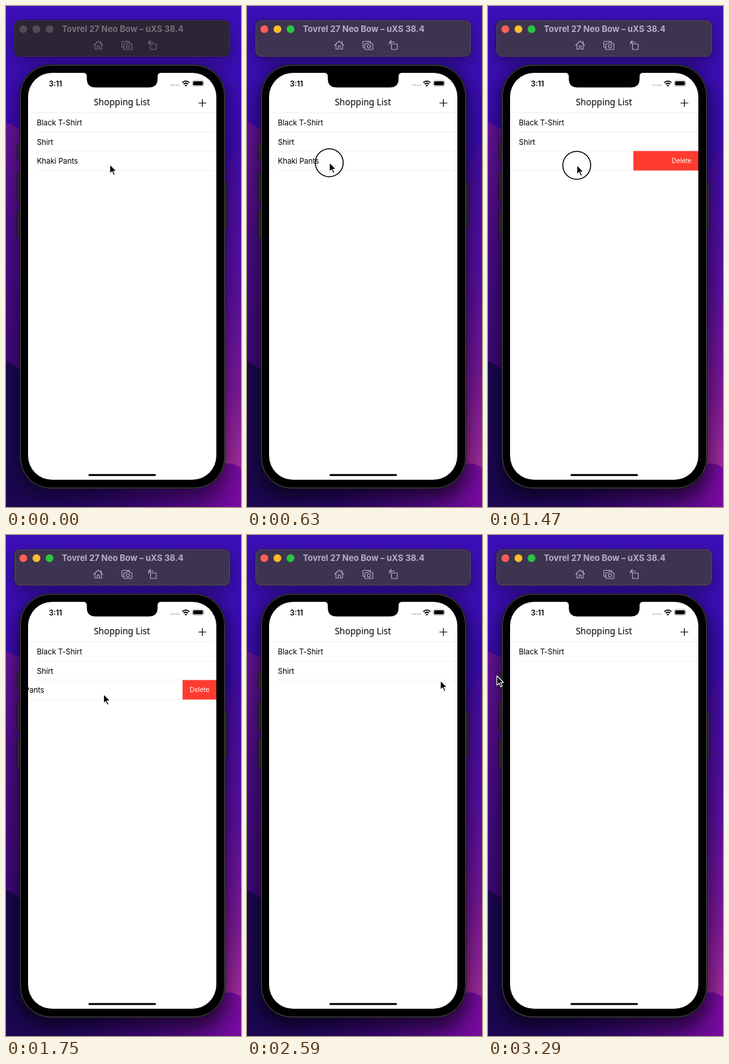
An HTML page for the animation above (3.36 s loop, 362x772 px).

```html
<!DOCTYPE html>
<html lang="en">
<head>
<meta charset="utf-8">
<title>Swipe to delete</title>
<style>
  html, body { margin: 0; width: 100%; height: 100%; overflow: hidden; background: #2c0a80; }
  svg { display: block; width: 362px; height: 772px; }
  text { font-family: Inter, Roboto, sans-serif; white-space: pre; }
  .row text { font-size: 11.5px; letter-spacing: -.03px; }
  .row .del { font-size: 10px; letter-spacing: 0; fill: #fff; }
  .line { stroke: #f0f0f1; stroke-width: 1; }
  .icon { fill: none; stroke-width: 1.1; stroke-linejoin: round; stroke-linecap: round; }
  #bar { --panel: #3e3351; --edge: #574a69; --ink: #b9aec6; --r: #ff5f57; --y: #febc2e; --g: #28c840; }
  #bar.idle { --panel: #2b2536; --edge: #3d3748; --ink: #75707b; --r: #514c58; --y: #514c58; --g: #514c58; }
  #bar .icon { stroke: var(--ink); }
</style>
</head>
<body>
<svg viewBox="0 0 362 772" xmlns="http://www.w3.org/2000/svg">
  <defs>
    <linearGradient id="sky" x2="0" y2="1">
      <stop offset="0" stop-color="#3d0fb9"/>
      <stop offset=".25" stop-color="#3a0cb0"/>
      <stop offset="1" stop-color="#2a0780"/>
    </linearGradient>
    <linearGradient id="hillL" x2="0" y2="1">
      <stop offset="0" stop-color="#68139a"/>
      <stop offset=".4" stop-color="#4c0c88"/>
      <stop offset="1" stop-color="#3a0876"/>
    </linearGradient>
    <linearGradient id="hillR" x2="0" y2="1">
      <stop offset="0" stop-color="#400ca6"/>
      <stop offset=".45" stop-color="#5a0fa0"/>
      <stop offset=".75" stop-color="#7c1899"/>
      <stop offset="1" stop-color="#a52d9f"/>
    </linearGradient>
    <linearGradient id="floor">
      <stop offset="0" stop-color="#1a0750"/>
      <stop offset=".4" stop-color="#2a0768"/>
      <stop offset=".75" stop-color="#500984"/>
      <stop offset="1" stop-color="#780ba0"/>
    </linearGradient>
    <filter id="blur" x="-30%" y="-30%" width="160%" height="160%"><feGaussianBlur stdDeviation="14"/></filter>
    <clipPath id="screen"><rect x="34" y="103" width="290" height="627" rx="37"/></clipPath>
  </defs>

  <rect width="362" height="772" fill="url(#sky)"/>
  <path d="M0 179Q30 190 60 230V600H0Z" fill="url(#hillL)"/>
  <path d="M300 300Q340 255 362 205V720H300Z" fill="url(#hillR)"/>
  <path d="M0 547Q22 555 60 600L300 735Q335 690 362 712V772H0Z" fill="url(#floor)"/>
  <g id="shadow" filter="url(#blur)">
    <rect x="18" y="100" width="323" height="660" rx="46"/>
    <rect x="13" y="32" width="332" height="56" rx="9" opacity=".6"/>
  </g>

  <g id="bar">
    <rect x="12.500" y="21.500" width="333" height="57" rx="9" fill="#160c2a"/>
    <rect x="13.500" y="22.500" width="331" height="55" rx="8" fill="var(--panel)" stroke="var(--edge)"/>
    <circle cx="26.700" cy="35.700" r="6" fill="var(--r)"/>
    <circle cx="46.900" cy="35.700" r="6" fill="var(--y)"/>
    <circle cx="67.100" cy="35.700" r="6" fill="var(--g)"/>
    <text x="86" y="40" font-size="12.900" font-weight="700" fill="var(--ink)">Tovrel 27 Neo Bow – uXS 38.4</text>
    <path class="icon" d="M135 60.500L142 54L149 60.500M137 59.500V66.500H140.500V61.500H143.500V66.500H147V59.500M146.500 57.500V54.500"/>
    <path class="icon" d="M181 64H179.500Q178.500 64 178.500 63V55.500Q178.500 54.500 179.500 54.500H189.500Q190.500 54.500 190.500 55.500V56"/>
    <path class="icon" d="M182.500 58H185L186 56.500H190L191 58H193Q194 58 194 59V66Q194 67 193 67H182.500Q181.500 67 181.500 66V59Q181.500 58 182.500 58Z"/>
    <circle class="icon" cx="187.800" cy="62.300" r="2.500"/>
    <rect class="icon" x="222.500" y="58.500" width="9" height="8.500" rx="1"/>
    <path class="icon" d="M219.500 59V57.500Q219.500 55.500 222 55.500H227M222.500 53L219.800 55.500L222.500 58"/>
  </g>

  <g fill="#29252f" stroke="#17131c" stroke-width=".8">
    <rect x="17" y="212" width="6" height="24" rx="1.500"/>
    <rect x="17" y="257" width="6" height="44" rx="1.500"/>
    <rect x="17" y="314" width="6" height="44" rx="1.500"/>
    <rect x="335" y="272" width="6" height="71" rx="1.500"/>
  </g>
  <rect x="21" y="90" width="317" height="654" rx="48" fill="#1d1d1f"/>
  <rect x="22.500" y="91.500" width="314" height="651" rx="46.500" stroke="#454547"/>

  <g clip-path="url(#screen)">
    <rect x="34" y="103" width="290" height="627" fill="#fff"/>
    <path class="line" d="M34 164.500H324"/>
    <g id="rows"></g>
  </g>
  <path d="M119 102H239V103Q233.500 103 233.500 108.500V112Q233.500 125.500 220 125.500H138Q124.500 125.500 124.500 112V108.500Q124.500 103 119 103Z"/>
  <text x="66" y="123.500" font-size="11.300" font-weight="600">3:11</text>
  <g fill="#b8b8ba">
    <circle cx="255" cy="122" r="1.200"/><circle cx="258.800" cy="122" r="1.200"/>
    <circle cx="262.600" cy="122" r="1.200"/><circle cx="266.400" cy="122" r="1.200"/>
  </g>
  <path d="M271.500 118.200Q277 113.200 282.500 118.200M273.600 120.500Q277 117.500 280.400 120.500" fill="none" stroke="#000" stroke-width="1.700"/>
  <path d="M275 122.300Q277 120.800 279 122.300L277 124.300Z"/>
  <rect x="287" y="114.700" width="17.500" height="8.800" rx="2.500" fill="none" stroke="#a0a0a2" stroke-width=".8"/>
  <rect x="288.200" y="115.900" width="15.100" height="6.400" rx="1.500"/>
  <path d="M305.500 117.700Q306.800 119.100 305.500 120.500Z" fill="#a0a0a2"/>
  <text x="178.500" y="153" font-size="13.600" font-weight="500" text-anchor="middle" style="font-family:'Noto Sans','Open Sans',sans-serif">Shopping List</text>
  <path d="M296.500 149.500H308.500M302.500 143.500V155.500" stroke="#000" stroke-width="1.200"/>
  <rect x="127" y="721.200" width="104" height="3" rx="1.500"/>

  <g id="pointer">
    <circle id="ring" cx="-.3" cy=".5" r="21.500" fill="none" stroke="#000" stroke-width="1.500"/>
    <path d="M0 0V14.300L3.300 11.300L5.800 16.900L8 15.900L5.600 10.500H10.200Z" stroke="#fff" stroke-width="1.100" stroke-linejoin="round"/>
  </g>
</svg>
<script>
const LOOP = 3360, STEP = 70, LEFT = 34, RIGHT = 324, TOP = 164.5, ROW = 29.6;
const $ = id => document.getElementById(id);

// Tables of [time, value, ...]
const path = [
  [0, 160, 244], [350, 127, 241], [700, 127, 241], [910, 237, 245], [1050, 237, 245],
  [1470, 137, 245], [1540, 131, 245], [1680, 133, 245], [2030, 299, 246], [2240, 299, 246],
  [2590, 298, 224], [2730, 262, 214], [2800, 262, 214], [3080, 139, 217.5], [3220, 16, 217], [3290, 13.7, 217]
];
const presses = [[490, 700], [1050, 1540], [2170, 2310], [2730, 3220]];
const focusAt = 490;
const items = [
  { name: 'Black T-Shirt', swipe: [[0, 0]], size: [[0, 1]] },
  { name: 'Shirt', swipe: [[2800, 0], [3080, 123], [3220, 290]], size: [[3150, 1], [3290, 0]] },
  { name: 'Khaki Pants',
    swipe: [[1050, 0], [1470, 100], [1540, 106], [1750, 52], [2240, 52], [2380, 290]],
    size: [[2310, 1], [2520, 0]] }
];

function at(keys, t) {
  const i = keys.findIndex(k => k[0] > t);
  if (i === 0) return keys[0].slice(1);
  if (i < 0) return keys[keys.length - 1].slice(1);
  const a = keys[i - 1], b = keys[i];
  const p = (t - a[0]) / (b[0] - a[0]), e = p * p * (3 - 2 * p);
  return a.slice(1).map((v, j) => v + (b[j + 1] - v) * e);
}

function add(parent, tag, attrs, text = '') {
  const el = document.createElementNS('http://www.w3.org/2000/svg', tag);
  for (const key in attrs) el.setAttribute(key, attrs[key]);
  el.textContent = text;
  return parent.appendChild(el);
}

items.forEach((item, i) => {
  const top = TOP + Math.round(ROW * i);
  const g = item.group = add($('rows'), 'g', { class: 'row', transform: `translate(0 ${top})` });
  item.body = add(g, 'g', {});
  add(item.body, 'text', { x: 47.6, y: 19 }, item.name);
  item.line = add(item.body, 'path', { class: 'line' });
  item.red = add(g, 'rect', { fill: '#ff3b30' });
  item.label = add(g, 'text', { class: 'del', y: 18.5 }, 'Delete');
  item.full = Math.round(ROW * (i + 1)) - Math.round(ROW * i);
});

function drawRow(item, t) {
  const [shift] = at(item.swipe, t), [size] = at(item.size, t);
  const edge = RIGHT - shift, h = Math.round(item.full * size);
  item.group.style.display = size > 0 ? '' : 'none';
  item.body.setAttribute('transform', `translate(${-shift} 0)`);
  item.line.setAttribute('d', `M48 ${h}H${RIGHT + shift}`);
  item.red.setAttribute('x', Math.max(LEFT, edge));
  item.red.setAttribute('width', shift);
  item.red.setAttribute('height', h);
  item.label.setAttribute('x', Math.max(283, edge + 11));
  item.label.style.display = shift > 0 && size > .7 ? '' : 'none';
}

function draw(t) {
  const [x, y] = at(path, t);
  $('pointer').setAttribute('transform', `translate(${x} ${y})`);
  $('ring').style.display = presses.some(([a, b]) => t >= a && t < b) ? '' : 'none';
  const idle = t < focusAt;
  $('bar').classList.toggle('idle', idle);
  $('shadow').setAttribute('opacity', idle ? .45 : .6);
  items.forEach(item => drawRow(item, t));
}

const start = performance.now();
function tick() {
  const t = (performance.now() - start) % LOOP;
  draw(Math.floor(t / STEP) * STEP);
  requestAnimationFrame(tick);
}
tick();
</script>
</body>
</html>
```
